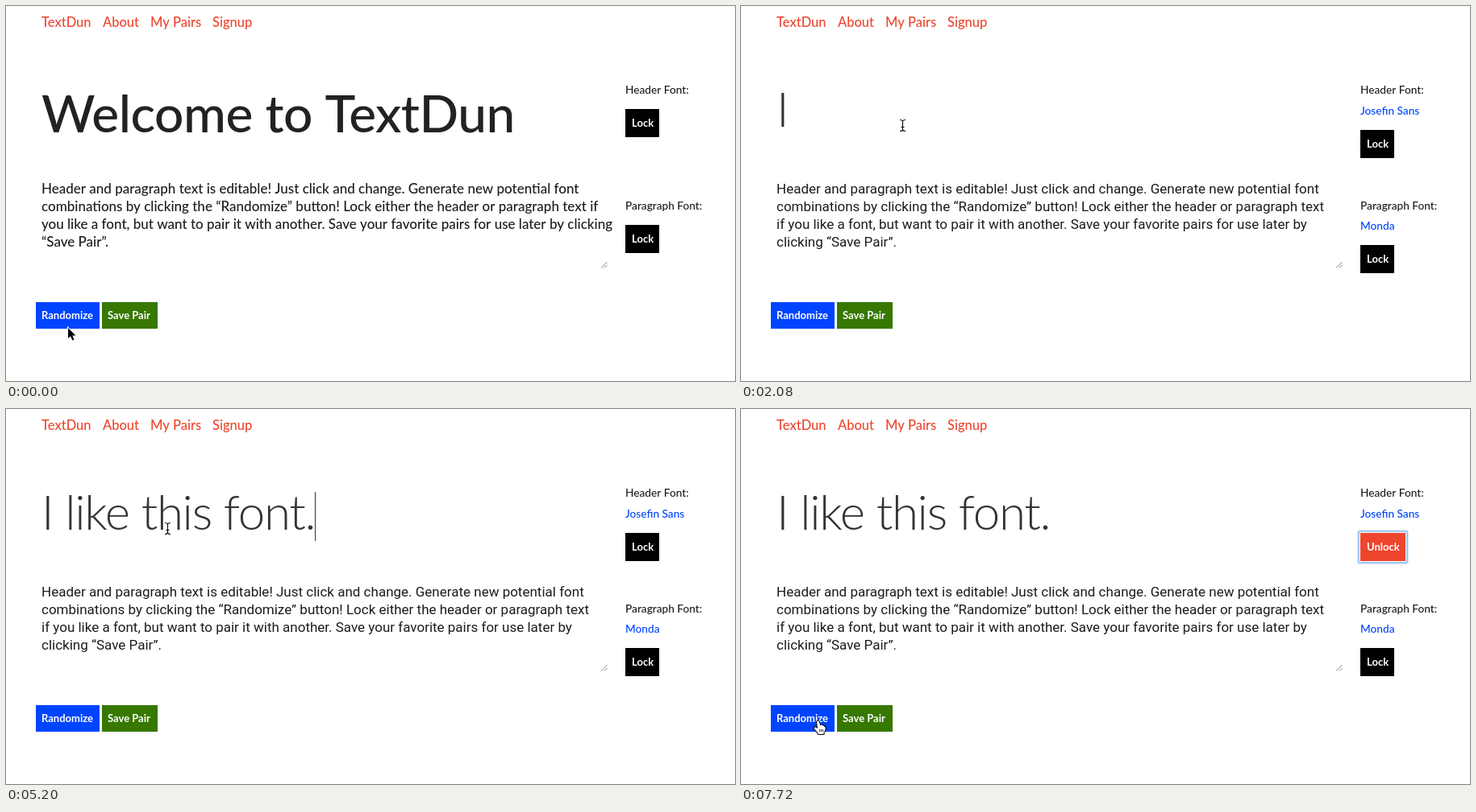
Write an HTML page with a canvas that moves like this. It is 904x466 px and loops after 8 s.

```html
<!DOCTYPE html>
<html lang="en">
<head>
<meta charset="utf-8">
<title>Font pairing page</title>
<style>
html, body { margin: 0; width: 100%; height: 100%; overflow: hidden; background: #fff; }
canvas { display: block; width: 904px; height: 466px; }
</style>
</head>
<body>
<canvas id="stage"></canvas>
<script>
const W = 904, H = 466, LOOP = 8000;
const canvas = document.getElementById('stage');
const ctx = canvas.getContext('2d');
const dpr = window.devicePixelRatio || 1;
canvas.width = W * dpr;
canvas.height = H * dpr;

const RED = '#ee452d', BLUE = '#0044ff', GREEN = '#367800', INK = '#1c1c1c';
const NAME = 'TextDun';
const WELCOME = 'Welcome to ' + NAME;
const SANS = 'Lato, sans-serif';
const FONT = {
  nav: `500 16.5px ${SANS}`,
  label: `500 13.7px ${SANS}`,
  button: `bold 13px ${SANS}`,
  bold: `500 64px ${SANS}`,
  light: `300 60px ${SANS}`,
  body: `500 17px ${SANS}`,
  square: '17px Roboto, sans-serif'
};

const NAV = [[NAME, 44], ['About', 120], ['My Pairs', 179], ['Signup', 256]];
const BODY_BEFORE = [
  'Header and paragraph text is editable! Just click and change. Generate new potential font',
  'combinations by clicking the “Randomize” button! Lock either the header or paragraph text if',
  'you like a font, but want to pair it with another. Save your favorite pairs for use later by clicking',
  '“Save Pair”.'
];
const BODY_AFTER = [
  'Header and paragraph text is editable! Just click and change. Generate new potential font',
  'combinations by clicking the “Randomize” button! Lock either the header or paragraph text',
  'if you like a font, but want to pair it with another. Save your favorite pairs for use later by',
  'clicking “Save Pair”.'
];

// time, heading, caret shown
const TYPING = [
  [0, WELCOME, 0], [580, WELCOME, 1], [1030, '', 0],
  [1480, 'I', 1], [1630, 'I ', 1], [2080, 'I ', 0],
  [2380, 'I l', 1], [2520, 'I li', 1], [2820, 'I lik', 1],
  [2970, 'I like ', 1], [3110, 'I like th', 1], [3260, 'I like this', 1],
  [3410, 'I like this ', 1], [3860, 'I like this o', 1], [4160, 'I like this on', 1],
  [4460, 'I like this o', 1], [4610, 'I like this f', 1], [4760, 'I like this fo', 1],
  [4900, 'I like this fon', 1], [5050, 'I like this font', 1],
  [5200, 'I like this font.', 1], [5650, 'I like this font.', 0]
];

// time, pointer shape, x, y
const POINTER = [
  [0, arrow, 76, 399], [150, hand, 77, 385], [440, beam, 200, 148],
  [5500, beam, 216, 151], [5650, beam, 345, 168], [5790, beam, 560, 196],
  [5940, arrow, 765, 218], [6090, arrow, 826, 219], [6240, arrow, 814, 204],
  [6380, hand, 798, 187],
  [6980, arrow, 752, 198], [7130, beam, 600, 243], [7280, beam, 390, 304],
  [7430, arrow, 215, 362], [7570, hand, 108, 384], [7720, hand, 96, 387]
];

const at = (list, t) => list.findLast(step => step[0] <= t);

function text(str, x, y, font, color, spacing = 0) {
  ctx.font = font;
  ctx.letterSpacing = spacing + 'px';
  ctx.fillStyle = color;
  ctx.fillText(str, x, y);
  return ctx.measureText(str).width;
}

function button(label, x, y, w, h, color, pad = 8) {
  ctx.fillStyle = color;
  ctx.fillRect(x, y, w, h);
  text(label, x + pad, y + h / 2 + 4.7, FONT.button, '#fff');
}

function focusRing(x, y, w, h) {
  [[3, '#dcebfb'], [2, '#9fc6f4']].forEach(([gap, color]) => {
    ctx.strokeStyle = color;
    ctx.lineWidth = 2;
    ctx.beginPath();
    ctx.roundRect(x - gap, y - gap, w + gap * 2, h + gap * 2, 2);
    ctx.stroke();
  });
}

function shape(d, fill, stroke, width) {
  const path = new Path2D(d);
  ctx.lineWidth = width;
  if (stroke) { ctx.strokeStyle = stroke; ctx.stroke(path); }
  if (fill) { ctx.fillStyle = fill; ctx.fill(path); }
}

function arrow() {
  shape('M1 1V14L4 11.3L6.3 16.5L8.5 15.5L6.3 10.6H10.5Z', '#000', '#fff', 2);
}

function hand() {
  shape('M-2 1.8Q-.5-.6 1 1.8L2 6Q4 4.6 5 6.4Q7 5.8 7.4 7.8Q9 7.8 8.6 10L8 13L6.5 15V17H0L-1 15L-5 10.5' +
    'Q-6 8-3.5 8.5L-1 10Z', '#fff', '#000', 2);
  shape('M1.5 11V14M3.5 11V14M5.5 11V14', null, '#000', 0.8);
}

function beam() {
  const d = 'M-3-6.5Q0-6.5 .5-5Q1-6.5 4-6.5M.5-5V6M-3 7.5Q0 7.5 .5 6Q1 7.5 4 7.5M-1.5 2.5H2.5';
  shape(d, null, '#fff', 2.4);
  shape(d, null, '#000', 1.1);
}

function drawHeading(t) {
  const [, str, caret] = at(TYPING, t);
  if (t < 150) {
    text(str, 44, 157, FONT.bold, '#222', -0.5);
    return;
  }
  const width = text(str, 44, 150, FONT.light, t < 1030 ? '#222' : '#333', -1.3);
  if (caret) {
    ctx.fillStyle = '#333';
    ctx.fillRect(Math.round(44 + (str === WELCOME ? 0 : width)), 103, 1, 61);
  }
}

function drawSide(t) {
  const named = t >= 150, locked = t >= 6680;
  text('Header Font:', 768, 109, FONT.label, INK);
  text('Paragraph Font:', 768, 253, FONT.label, INK);
  if (named) {
    text('Josefin Sans', 768, 135, FONT.label, BLUE);
    text('Monda', 768, 278, FONT.label, BLUE);
  }
  const y = named ? 154 : 128, w = locked ? 56 : 42;
  if (t >= 6530) focusRing(768, y, w, 35);
  button(locked ? 'Unlock' : 'Lock', 768, y, w, 35, locked ? RED : '#000');
  button('Lock', 768, named ? 297 : 272, 42, 35, '#000');
}

function draw(t) {
  ctx.setTransform(dpr, 0, 0, dpr, 0, 0);
  ctx.fillStyle = '#fff';
  ctx.fillRect(0, 0, W, H);

  NAV.forEach(([label, x]) => text(label, x, 26, FONT.nav, RED));
  drawHeading(t);
  const lines = t < 150 ? BODY_BEFORE : BODY_AFTER;
  lines.forEach((line, i) => text(line, 44, 233 + i * 22, t < 150 ? FONT.body : FONT.square, INK));
  shape('M738 325.5L745.5 318M742 325.5L745.5 322', null, '#777', 0.9);
  drawSide(t);
  button('Randomize', 37, 368, 79, 33, BLUE, 7);
  button('Save Pair', 119, 368, 69, 33, GREEN, 7);

  const [, pointer, x, y] = at(POINTER, t);
  ctx.translate(x, y);
  pointer();
}

const start = performance.now();
function frame() {
  draw((performance.now() - start) % LOOP);
  requestAnimationFrame(frame);
}
frame();
</script>
</body>
</html>
```
